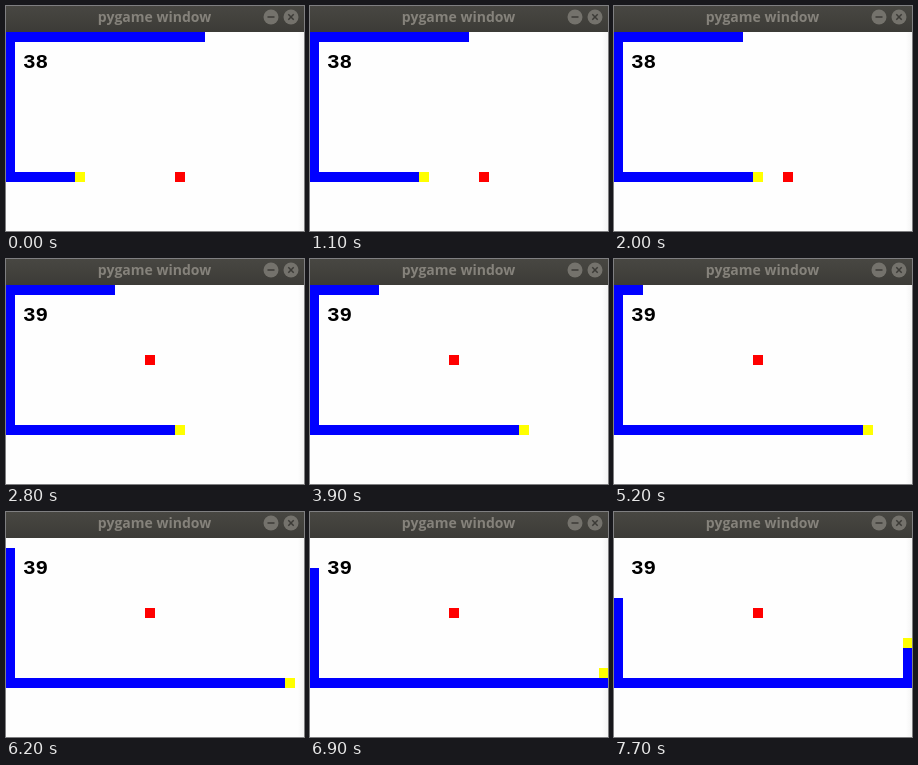
These frames come from a looping animation (298x225 px, 8000 ms). An HTML page:

```html
<!DOCTYPE html>
<html lang="en">
<head>
<meta charset="utf-8">
<title>Snake</title>
<style>
  html, body { margin: 0; width: 100%; height: 100%; overflow: hidden; background: #fefefe; }
  svg { display: block; width: 100vw; height: 100vh; }
  .title { font: 700 14px "Open Sans", "Noto Sans", sans-serif; fill: #85827b; text-anchor: middle; }
  .score { font: 700 21px "Liberation Mono", monospace; fill: #000; }
  .cells { shape-rendering: crispEdges; }
</style>
</head>
<body>
<svg viewBox="0 0 298 225">
  <defs>
    <linearGradient id="bar" x2="0" y2="1">
      <stop offset="0" stop-color="#484742"/>
      <stop offset="1" stop-color="#3c3b37"/>
    </linearGradient>
    <linearGradient id="edge">
      <stop offset="0" stop-color="#fefefe"/>
      <stop offset="1" stop-color="#f4f4f4"/>
    </linearGradient>
  </defs>
  <rect width="298" height="225" fill="#fefefe"/>
  <rect x="292" y="26" width="6" height="199" fill="url(#edge)"/>

  <rect width="298" height="26" fill="url(#bar)"/>
  <text class="title" x="148.5" y="16">pygame window</text>
  <g fill="#74726c">
    <circle cx="265" cy="11" r="7.5"/>
    <circle cx="285" cy="11" r="7.5"/>
  </g>
  <path d="M261.5 11h7M282.3 8.3l5.4 5.4m0-5.4l-5.4 5.4" stroke="#3c3b37" stroke-width="1.5" fill="none"/>

  <g class="cells">
    <path id="body" fill="#00f"/>
    <path id="food" fill="#f00"/>
    <path id="head" fill="#ff0"/>
  </g>
  <text class="score" id="score" x="17" y="62"></text>
</svg>
<script>
  const LOOP = 8000;
  const START_LENGTH = 41;
  const EAT_MOVE = 10;
  const moves = [300, 600, 900, 1100, 1400, 1600, 2000, 2300, 2500, 2800, 3100, 3400, 3600,
    3900, 4300, 4500, 4900, 5200, 5600, 5900, 6200, 6600, 6900, 7200, 7500, 7700];

  // Route in grid cells: left along the top, down, right, then up.
  const corners = [[19, 0], [0, 0], [0, 14], [29, 14], [29, 10]];
  const route = [corners[0]];
  for (const [col, row] of corners.slice(1)) {
    let [c, r] = route[route.length - 1];
    while (c !== col || r !== row) {
      c += Math.sign(col - c);
      r += Math.sign(row - r);
      route.push([c, r]);
    }
  }

  const byId = id => document.getElementById(id);
  const cell = ([col, row]) => `M${col * 10 - 1} ${row * 10 + 26}h10v10h-10z`;

  function render(time) {
    const step = moves.filter(t => t <= time).length;
    const eaten = step >= EAT_MOVE ? 1 : 0;
    const head = START_LENGTH - 1 + step;
    const tail = step - eaten;
    byId("body").setAttribute("d", route.slice(tail, head).map(cell).join(""));
    byId("head").setAttribute("d", cell(route[head]));
    byId("food").setAttribute("d", cell(eaten ? [14, 7] : [17, 14]));
    byId("score").textContent = 38 + eaten;
  }

  const begin = performance.now();
  function tick() {
    render((performance.now() - begin) % LOOP);
    requestAnimationFrame(tick);
  }
  tick();
</script>
</body>
</html>
```
